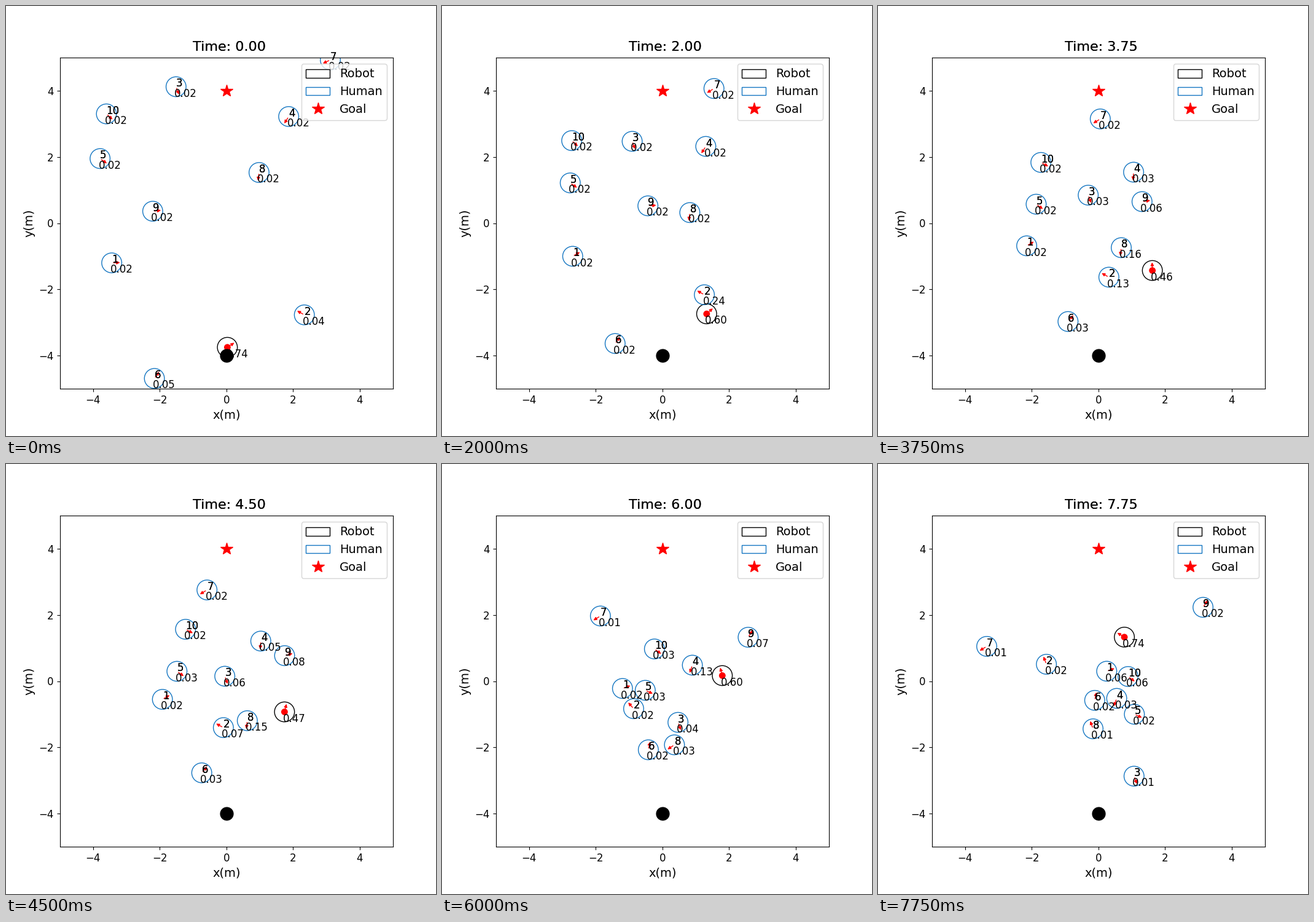
These frames come from a looping animation (700 by 700 pixels, 8000 ms). A matplotlib script:

```python
import numpy as np
import matplotlib.pyplot as plt
from matplotlib.animation import FuncAnimation
from matplotlib.lines import Line2D
from matplotlib.patches import ArrowStyle, Circle, FancyArrowPatch

STEP = 0.25
FRAMES = 32
RADIUS = 0.3
BLUE = "#1677c2"

# Everyone walks straight between a few turning points (time, x, y).
ROBOT_PATH = [(0, 0.03, -3.75), (1, 0.66, -3.34), (2.75, 1.83, -2.29),
              (3.75, 1.62, -1.43), (5.5, 1.91, -0.26), (6.75, 1.63, 0.81),
              (7.75, 0.78, 1.33)]
HUMAN_PATHS = [
    [(0, -3.44, -1.2), (1, -3, -1.18), (5.5, -1.61, -0.37), (7.75, 0.25, 0.3)],
    [(0, 2.34, -2.77), (5.5, -0.63, -1.1), (6.75, -1.21, -0.43), (7.75, -1.56, 0.51)],
    [(0, -1.51, 4.12), (1, -1.25, 3.4), (7.75, 1.07, -2.87)],
    [(0, 1.87, 3.22), (2.75, 1.09, 1.98), (5.5, 1, 0.77), (7.75, 0.55, -0.52)],
    [(0, -3.79, 1.95), (5.5, -0.97, -0.07), (7.75, 1.08, -1)],
    [(0, -2.16, -4.69), (2.75, -1.14, -3.24), (5.5, -0.51, -2.5), (7.75, -0.11, -0.58)],
    [(0, 3.12, 4.93), (1, 2.4, 4.59), (7.75, -3.35, 1.05)],
    [(0, 0.98, 1.53), (5.5, 0.55, -1.8), (6.75, 0.08, -2.11), (7.75, -0.16, -1.44)],
    [(0, -2.21, 0.36), (1, -1.43, 0.45), (3.75, 1.31, 0.65), (5.5, 2.33, 0.93),
     (6.75, 2.94, 1.92), (7.75, 3.14, 2.23)],
    [(0, -3.6, 3.3), (2.75, -2.39, 2.19), (5.5, -0.56, 1.21), (7.75, 0.89, 0.14)],
]


def locate(path, t):
    times, xs, ys = zip(*path)
    return np.array([np.interp(t, times, xs), np.interp(t, times, ys)])


def heading(path, t):
    """Unit vector of travel, averaged over one step either side."""
    move = locate(path, t + STEP) - locate(path, t - STEP)
    return move / np.linalg.norm(move)


def attention(spots, t):
    """The robot keeps a slowly varying share; nearer humans get more of the rest."""
    own = 0.6 + 0.14 * np.cos(2 * np.pi * t / (FRAMES * STEP))
    distance = np.linalg.norm(spots[1:] - spots[0], axis=1)
    weight = 0.03 + np.exp(-distance / 0.7)
    return [own, *((1 - own) * weight / weight.sum())]


fig, ax = plt.subplots(figsize=(7, 7), dpi=100)
ax.set_xlim(-5, 5)
ax.set_ylim(-5, 5)
ax.tick_params(labelsize=12)
ax.set_xlabel("x(m)", fontsize=14)
ax.set_ylabel("y(m)", fontsize=14)


def double_text(*args, **style):
    """Two texts on top of each other, for a heavier edge."""
    return [ax.text(*args, **style) for _ in range(2)]


def marker(x, y, shape, color):
    line = Line2D([x], [y], color=color, marker=shape, linestyle="None", markersize=15)
    return ax.add_artist(line)


class Agent:
    def __init__(self, path, color, name=""):
        self.path = path
        self.ring = ax.add_patch(Circle((0, 0), RADIUS, fill=False, edgecolor=color))
        self.dot = ax.add_patch(Circle((0, 0), 0.1, color="red", lw=0, visible=not name))
        head = ArrowStyle("-|>", head_length=3, head_width=1.5)
        self.arrow = ax.add_patch(
            FancyArrowPatch((0, 0), (0, 1), color="red", arrowstyle=head))
        self.names = double_text(0, 0, name, fontsize=12)
        self.score = ax.text(0, 0, "", fontsize=12)

    def place(self, spot, t, score):
        x, y = spot
        self.ring.center = self.dot.center = x, y
        self.arrow.set_positions((x, y), tuple(spot + RADIUS * heading(self.path, t)))
        for text in self.names:
            text.set_position((x, y))
        self.score.set_position((x - 0.05, y - 0.3))
        self.score.set_text(f"{score:.2f}")


start = marker(0, -4, "o", "black")
goal = marker(0, 4, "*", "red")
agents = [Agent(ROBOT_PATH, "black")]
agents += [Agent(path, BLUE, str(i)) for i, path in enumerate(HUMAN_PATHS, 1)]
clock = double_text(0.4, 1.02, "", fontsize=16, transform=ax.transAxes)
ax.legend([agents[0].ring, agents[1].ring, goal], ["Robot", "Human", "Goal"],
          loc="upper right", fontsize=14)


def update(i):
    t = i * STEP
    for text in clock:
        text.set_text(f"Time: {t:.2f}")
    spots = np.array([locate(agent.path, t) for agent in agents])
    for agent, spot, score in zip(agents, spots, attention(spots, t)):
        agent.place(spot, t, score)
    return []


anim = FuncAnimation(fig, update, frames=FRAMES, interval=1000 * STEP,
                     repeat=True, repeat_delay=0, blit=False)
plt.show()
```
